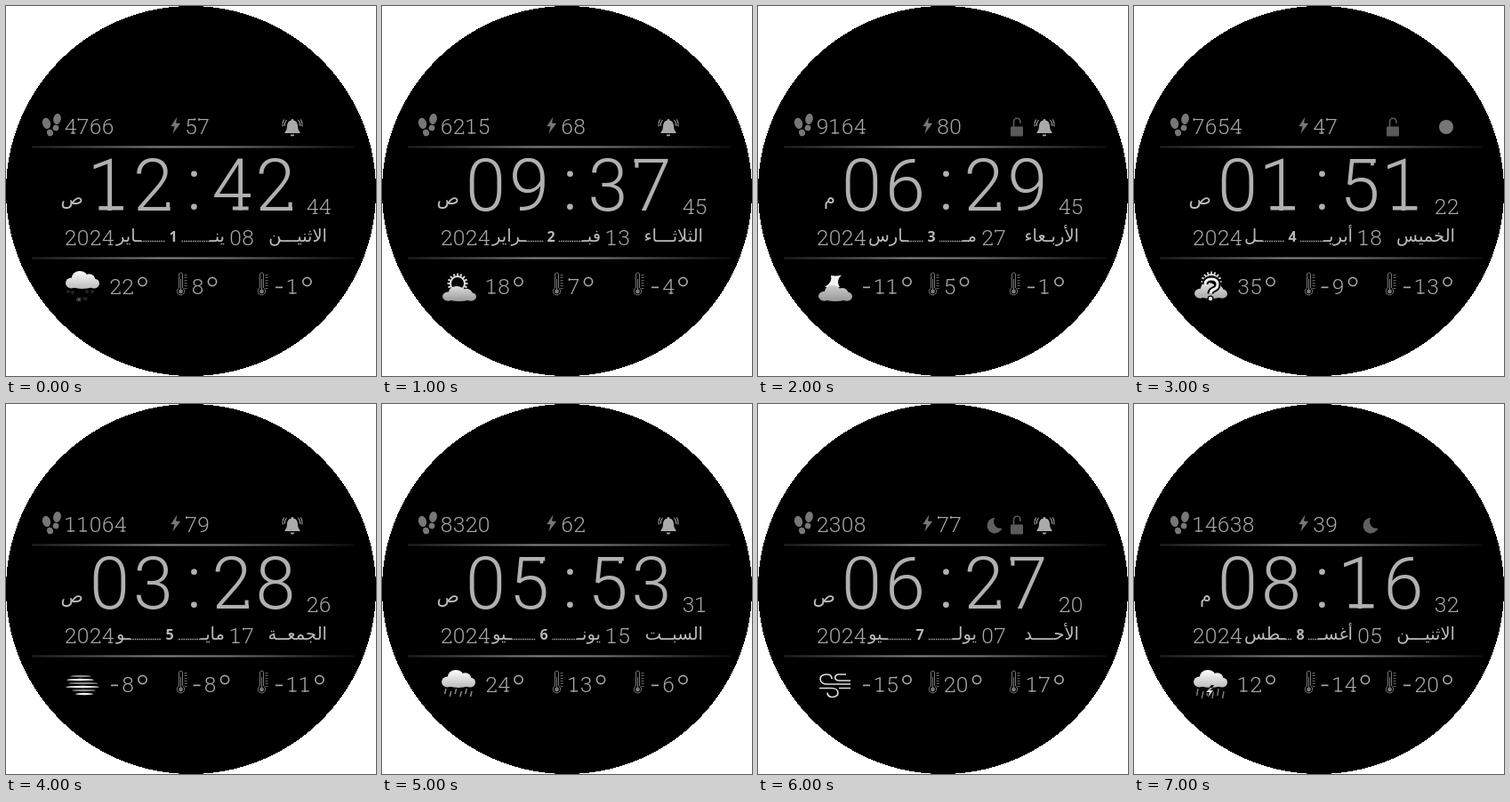
An HTML page with a canvas that plays this animation: 416x416 px, repeating every 8000 ms.

```html
<!DOCTYPE html>
<html lang="ar">
<head>
<meta charset="utf-8">
<style>
html, body { margin: 0; width: 100%; height: 100%; overflow: hidden; background: #fff; }
canvas { display: block; }
</style>
</head>
<body>
<canvas id="face" width="416" height="416"></canvas>
<script>
const ctx = document.getElementById('face').getContext('2d');
const TAU = Math.PI * 2, KASHIDA = 'ـ';
const ARABIC = '"DejaVu Sans", sans-serif';

// One entry per second; month is [start, end, x of its number].
const scenes = [
  { steps: '4766', power: '57', status: 'bell', time: '1242', half: 'ص', sec: '44', weekday: 'الاثنيـن', day: '08', month: ['ين', 'اير', 188], icon: 'snow', temps: ['22', '8', '-1'] },
  { steps: '6215', power: '68', status: 'bell', time: '0937', half: 'ص', sec: '45', weekday: 'الثلاثـاء', day: '13', month: ['فب', 'راير', 190], icon: 'day', temps: ['18', '7', '-4'] },
  { steps: '9164', power: '80', status: 'lock bell', time: '0629', half: 'م', sec: '45', weekday: 'الأربـعاء', day: '27', month: ['م', 'ارس', 195], icon: 'night', temps: ['-11', '5', '-1'] },
  { steps: '7654', power: '47', status: 'lock link', time: '0151', half: 'ص', sec: '22', weekday: 'الخميـس', day: '18', month: ['أبري', 'ل', 178], icon: 'unknown', temps: ['35', '-9', '-13'] },
  { steps: '11064', power: '79', status: 'bell', time: '0328', half: 'ص', sec: '26', weekday: 'الجمعـة', day: '17', month: ['ماي', 'و', 184], icon: 'fog', temps: ['-8', '-8', '-11'] },
  { steps: '8320', power: '62', status: 'bell', time: '0553', half: 'ص', sec: '31', weekday: 'السبـت', day: '15', month: ['يون', 'يو', 182], icon: 'rain', temps: ['24', '13', '-6'] },
  { steps: '2308', power: '77', status: 'moon lock bell', time: '0627', half: 'ص', sec: '20', weekday: 'الأحـد', day: '07', month: ['يول', 'يو', 182], icon: 'wind', temps: ['-15', '20', '17'] },
  { steps: '14638', power: '39', status: 'moon', time: '0816', half: 'م', sec: '32', weekday: 'الاثنيـن', day: '05', month: ['أغس', 'طس', 187], icon: 'storm', temps: ['12', '-14', '-20'] }
];

// Slab serifs in em: x, y, width, height from the digit's centre on the baseline.
const serifs = {
  1: [-.15, -.055, .34, .055],
  2: [.18, -.11, .05, .11],
  4: [.01, -.05, .22, .05],
  5: [.15, -.71, .045, .09],
  7: [-.23, -.71, .05, .12]
};

function fill(d, color) {
  ctx.fillStyle = color;
  ctx.fill(new Path2D(d));
}

function stroke(d, color, width) {
  ctx.strokeStyle = color;
  ctx.lineWidth = width;
  ctx.stroke(new Path2D(d));
}

function ellipse(x, y, rx, ry, color, turn = 0) {
  ctx.fillStyle = color;
  ctx.beginPath();
  ctx.ellipse(x, y, rx, ry, turn, 0, TAU);
  ctx.fill();
}

// Filled row by row so that the rim stays hard-edged.
function dial() {
  ctx.fillStyle = '#000';
  for (let y = 0; y < 416; y++) {
    const half = Math.round(Math.sqrt(208 ** 2 - (y + .5 - 208) ** 2));
    ctx.fillRect(208 - half, y, 2 * half, 1);
  }
}

function digits(text, x, baseline, size = 24.5, pitch = 14, color = '#a6a6a6') {
  ctx.font = `300 ${size}px Roboto, sans-serif`;
  ctx.textAlign = 'center';
  ctx.direction = 'ltr';
  ctx.fillStyle = color;
  for (const char of text) {
    if (char === '-') {
      ctx.fillRect(x - 5, baseline - 8, 8, 1.7);
    } else {
      ctx.fillText(char, char === '1' ? x - size * .03 : x, baseline);
      const slab = serifs[char];
      if (slab) ctx.fillRect(x + slab[0] * size, baseline + slab[1] * size, slab[2] * size, slab[3] * size);
    }
    x += pitch;
  }
  return x;
}

function arabic(text, x, y, size, align = 'right') {
  ctx.font = `${size}px ${ARABIC}`;
  ctx.textAlign = align;
  ctx.direction = 'rtl';
  ctx.fillStyle = '#bbb';
  ctx.fillText(text, x, y);
  return ctx.measureText(text).width;
}

// Repeats the kashida for as long as the word still fits.
function lengthen(word, width, size) {
  ctx.font = `${size}px ${ARABIC}`;
  const stretched = n => word.replace(KASHIDA, KASHIDA.repeat(n));
  let count = 0;
  while (ctx.measureText(stretched(count + 1)).width <= width) count++;
  return stretched(count);
}

function monthName([start, end, x], number) {
  const startX = 246 - arabic(start + KASHIDA, 246, 265, 19.5);
  const endX = 124 + arabic(KASHIDA + end, 124, 265, 19.5, 'left');
  ctx.setLineDash([1.5, 1]);
  if (startX > x + 9) stroke(`M${startX} 264.5H${x + 9}`, '#aaa', 1.3);
  if (endX < x - 9) stroke(`M${endX} 264.5H${x - 9}`, '#aaa', 1.3);
  ctx.setLineDash([]);
  ctx.font = '600 16px "Noto Sans", sans-serif';
  ctx.textAlign = 'center';
  ctx.fillStyle = '#b8b8b8';
  ctx.fillText(number, x, 265);
}

function divider(y) {
  const shade = ctx.createLinearGradient(29, 0, 392, 0);
  shade.addColorStop(0, '#1c1c1c');
  shade.addColorStop(.4, '#808080');
  shade.addColorStop(.6, '#707070');
  shade.addColorStop(1, '#0c0c0c');
  ctx.fillStyle = shade;
  ctx.globalAlpha = .6;
  ctx.fillRect(29, y - 1, 363, 3);
  ctx.globalAlpha = 1;
  ctx.fillRect(29, y, 363, 1);
}

function thermometer(x) {
  stroke(`M${x - 2} 317V302a2 2 0 0 1 4 0V317a4.2 4.2 0 1 1-4 0Z`, '#777', 1);
  stroke(`M${x} 307V320`, '#777', 1);
  ellipse(x, 321, 2.4, 2.4, '#777');
  for (let y = 302.5; y < 318; y += 3) stroke(`M${x + 4} ${y}h3`, '#666', 1);
}

function temperature(text, x) {
  const end = digits(text, x, 323.5);
  ctx.strokeStyle = '#a6a6a6';
  ctx.lineWidth = 1.7;
  ctx.beginPath();
  ctx.arc(end + 2.5, 310, 4.6, 0, TAU);
  ctx.stroke();
}

function cloud(x, y, w, h, top = '#fff', bottom = '#bbb') {
  const shade = ctx.createLinearGradient(0, y, 0, y + h);
  shade.addColorStop(0, top);
  shade.addColorStop(1, bottom);
  const puffs = [[.17, .68, .17, .3], [.42, .4, .24, .4], [.7, .5, .18, .34], [.84, .7, .16, .28], [.5, .76, .38, .24]];
  for (const [cx, cy, rx, ry] of puffs) ellipse(x + cx * w, y + cy * h, rx * w, ry * h, shade);
}

function sun(x, y) {
  for (let i = 0; i < 16; i++) {
    const a = i * TAU / 16, c = Math.cos(a), s = Math.sin(a);
    stroke(`M${x + 8 * c} ${y + 8 * s}L${x + 11.5 * c} ${y + 11.5 * s}`, '#ddd', 1.8);
  }
  ctx.lineWidth = 2;
  ctx.beginPath();
  ctx.arc(x, y, 8, 0, TAU);
  ctx.stroke();
}

function drops(color, height) {
  for (let i = 0; i < 6; i++) stroke(`M${72 + i * 5.8} ${320 + i % 2 * 3}l-1.5 ${height}`, color, 1.5);
}

const statusIcons = {
  moon() { fill('M266.5 128A8.7 8.7 0 1 0 274.5 139.5A7.4 7.4 0 0 1 266.5 128Z', '#606060'); },
  lock() {
    fill('M285 135.5h12q1 0 1 1v9q0 1-1 1h-12q-1 0-1-1v-9q0-1 1-1Z', '#5a5a5a');
    stroke('M287.5 136V130a3.7 3.7 0 0 1 7.4 0v2', '#5a5a5a', 1.6);
  },
  bell() {
    fill('M322 127q1.3 0 1.3 1.4q4.7 1.1 4.7 7.1q0 4 2.5 6.500v1h-17v-1q2.500-2.500 2.500-6.500q0-6 4.700-7.100q0-1.400 1.300-1.400ZM319.500 144.500h5q-.5 2-2.500 2t-2.500-2Z', '#aaa');
    stroke('M315.500 128q-2.500 3-2.500 7M312.500 127.500q-2 4-1.500 8M328.500 128q2.500 3 2.500 7M331.500 127.500q2 4 1.500 8', '#aaa', 1.1);
  },
  link() { ellipse(351, 136, 8, 8, '#777'); }
};

const weatherIcons = {
  snow() {
    cloud(67, 298, 38, 20);
    for (const [x, y] of [[70, 321], [75, 322], [91, 321], [97, 321]]) ellipse(x, y, 2, 2, '#242424');
    for (const [x, y] of [[82, 330], [89, 329]]) {
      stroke(`M${x - 3} ${y}h6M${x - 1.5} ${y - 2.6}l3 5.2M${x + 1.5} ${y - 2.6}l-3 5.2`, x < 85 ? '#777' : '#333', .8);
    }
  },
  day() {
    sun(85, 312);
    cloud(68, 315, 38, 17, '#ddd', '#999');
  },
  night() {
    fill('M94 302.5Q88 304 82 303Q84 311 75 316H92Q87 309 94 302.5Z', '#f2f2f2');
    cloud(68, 314, 38, 18, '#ccc', '#999');
  },
  unknown() {
    sun(87, 310);
    cloud(68, 311, 37, 18, '#e4e4e4', '#aaa');
    const mark = 'M80 313q0-6 7-6t7 6q0 4-4 5.5q-4 1.5-4 5';
    stroke(mark, '#000', 7);
    stroke(mark, '#f2f2f2', 3);
    ellipse(86, 329, 3.5, 3.5, '#000');
    ellipse(86, 329, 2.2, 2.2, '#f2f2f2');
  },
  fog() {
    const bars = [[72, 306, 24], [68, 310, 31], [70, 314, 34], [67, 318, 38], [74, 322, 27], [78, 326, 20]];
    bars.forEach(([x, y, w], i) => ellipse(x + w / 2, y, w / 2, 1.2, i % 2 ? '#f2f2f2' : '#888'));
  },
  rain() {
    cloud(67, 299, 38, 20);
    drops('#888', 6);
  },
  wind() {
    stroke('M104 311H92c-7 0-7-7-1-7h8', '#ddd', 1.7);
    stroke('M104 315H78c-10 0-11-11-1-11q6 0 6 5', '#ddd', 1.7);
    stroke('M69 319.5H83c9 0 9 10 1 10q-6 0-6-5M104 319.5H91', '#ddd', 1.7);
  },
  storm() {
    cloud(67, 299, 38, 20);
    drops('#777', 8);
    fill('M87 316l-8 9h5l-3 8l9-10h-5l5-7Z', '#000');
    fill('M86 319l-5 5h4l-2 6l6-8h-4l3-3Z', '#ddd');
  }
};

function footprints() {
  ellipse(45.5, 132, 4.5, 6.3, '#777', -.25);
  ellipse(49.5, 142.5, 3.5, 3.8, '#777', -.3);
  ellipse(57.5, 127, 4.3, 6, '#777', .2);
  ellipse(56, 137, 3.4, 3.4, '#777', .2);
}

function draw() {
  const index = Math.floor(performance.now() % 8000 / 1000);
  const scene = scenes[index];
  ctx.clearRect(0, 0, 416, 416);
  dial();
  divider(158);
  divider(283);

  footprints();
  digits(scene.steps, 72.5, 143.5);
  fill('M192.5 124.5L185.5 135L189.5 135.5L187.5 143.5L196 132L191 131.5Z', '#777');
  digits(scene.power, 208, 143.5);
  for (const name of scene.status.split(' ')) statusIcons[name]();

  digits(scene.time.slice(0, 2), 116.5, 229.5, 81, 49, '#b0b0b0');
  digits(':', 211.5, 229, 81, 0, '#b0b0b0');
  digits(scene.time.slice(2), 254, 229.5, 81, 49, '#b0b0b0');
  digits(scene.sec, 344.5, 234);
  arabic(scene.half, 87, 223, 21);

  digits('2024', 72.5, 269);
  monthName(scene.month, index + 1);
  digits(scene.day, 258, 269);
  arabic(lengthen(scene.weekday, 67, 19.5), 361, 265, 19.5);

  weatherIcons[scene.icon]();
  temperature(scene.temps[0], 123);
  thermometer(196.5);
  temperature(scene.temps[1], 215.5);
  thermometer(287.5);
  temperature(scene.temps[2], 308);
  requestAnimationFrame(draw);
}
draw();
</script>
</body>
</html>
```
